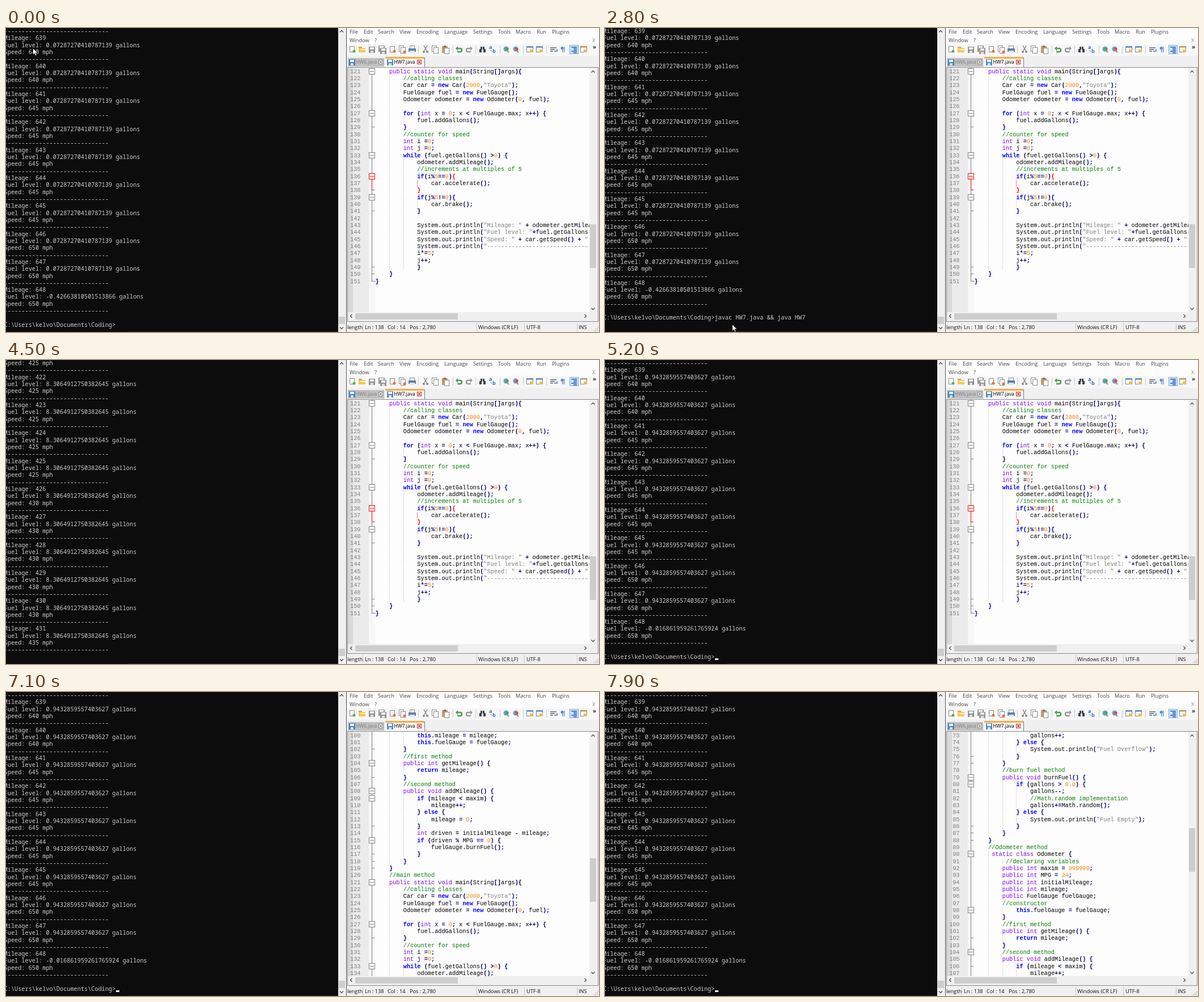
Write an HTML page with a canvas that moves like this. It is 1046 px wide and 536 px high and loops after 8 s.

```html
<!DOCTYPE html>
<html lang="en">
<head>
<meta charset="utf-8">
<title>Terminal and editor</title>
<style>
html, body { margin: 0; width: 100%; height: 100%; overflow: hidden; background: #0c0c0c; }
canvas { display: block; }
</style>
</head>
<body>
<canvas id="stage" width="1046" height="536"></canvas>
<script>
const g = document.getElementById('stage').getContext('2d');
const LOOP = 8000, ROW = 12.326, COL = 6.155;
const UI = '9.2px "Open Sans", sans-serif';
const TAB = '8.5px "Open Sans", sans-serif';
const TERM = '500 10.26px "Noto Sans Mono", monospace';
const CODE = '10.26px "Liberation Mono", monospace';
const FIRST = 73;
const source = `                gallons++;
            } else {
                System.out.println("Fuel Overflow");
            }
        }
        //burn fuel method
        public void burnFuel() {
            if (gallons > 0.0) {
                gallons--;
                //Math.random implementation
                gallons+=Math.random();
            } else {
                System.out.println("Fuel Empty");
            }
        }
    }
    //Odometer method
     static class Odometer {
         //declaring variables
        public int maxim = 999999;
        public int MPG = 24;
        public int initialMileage;
        public int mileage;
        public FuelGauge fuelGauge;
        //constructor
        public Odometer(int mileage, FuelGauge fuelGauge) {
            this.initialMileage = mileage;
            this.mileage = mileage;
            this.fuelGauge = fuelGauge;
        }
        //first method
        public int getMileage() {
            return mileage;
        }
        //second method
        public void addMileage() {
            if (mileage < maxim) {
                mileage++;
            } else {
                mileage = 0;
            }
            int driven = initialMileage - mileage;
            if (driven % MPG == 0) {
                fuelGauge.burnFuel();
            }
        }
    }
    //main method
    public static void main(String[]args){
        //calling classes
        Car car = new Car(2000,"Toyota");
        FuelGauge fuel = new FuelGauge();
        Odometer odometer = new Odometer(0, fuel);

        for (int x = 0; x < FuelGauge.max; x++) {
            fuel.addGallons();
        }
        //counter for speed
        int i =0;
        int j =0;
        while (fuel.getGallons() >0) {
            odometer.addMileage();
            //increments at multiples of 5
            if(i%5==0){
                car.accelerate();
            }
            if(j%5!=0){
                car.brake();
            }

            System.out.println("Mileage: " + odometer.getMileage());
            System.out.println("Fuel level: "+fuel.getGallons() + " gallons");
            System.out.println("Speed: " + car.getSpeed() + " mph");
            System.out.println("------------------------------");
            i*=5;
            j++;
            }
    }
}`.split('\n');

// Timelines: each entry holds from its time until the next one.
const pointerSteps = [
  [0, 47, 35], [100, 130, 190], [200, 316, 514], [300], [500, 228, 522], [600, 224, 522],
  [3400, 190, 420], [3500, 140, 300], [3600, 90, 180], [3700, 40, 80], [3800, 4, 16], [3900],
  [4100, 36, -6], [4200, 36, -11], [4400],
  [4800, 534, 218], [4900, 555, 208], [5000, 578, 195], [5100, 600, 184], [5200]
];
const beamSteps = [[0], [5700, 739, 211], [5800, 743, 220], [5900, 747, 230], [6000, 750, 240], [6100, 753, 247], [6200]];
// time, first line, scrollbar line, row where text lags three lines behind
const scrollSteps = [
  [0, 121, 121], [6400, 118, 118], [6600, 112, 112], [6700, 106, 106], [7100, 100, 100],
  [7200, 94, 94], [7500, 85, 85], [7600, 76, 79], [7900, 73, 79, 25]
];
// time, last mileage, fuel, final fuel
const outputSteps = [
  [0, 648, '0.07287270410787139', '-0.42663810501513866'],
  [4400, 214, '17.513174826903471'],
  [4500, 431, '8.3064912750382645'],
  [4600, 648, '0.9432859557403627', '-0.016861959261765924']
];
const at = (steps, t) => steps.findLast(s => s[0] <= t);

function rect(color, x, y, w, h) { g.fillStyle = color; g.fillRect(x, y, w, h); }
function box(color, x, y, w, h) { g.strokeStyle = color; g.strokeRect(x + .5, y + .5, w - 1, h - 1); }
function text(s, x, y, color, font) {
  if (font) g.font = font;
  g.fillStyle = color;
  g.fillText(s, x, y);
}
function line(color, width, ...p) {
  g.strokeStyle = color;
  g.lineWidth = width;
  g.beginPath();
  for (let i = 0; i < p.length; i += 2) g.lineTo(p[i], p[i + 1]);
  g.stroke();
  g.lineWidth = 1;
}
function disc(color, x, y, r) {
  g.fillStyle = color;
  g.beginPath();
  g.arc(x, y, r, 0, 7);
  g.fill();
}
function chevron(x, y, dx, dy) {
  const px = dy * 3, py = dx * 3;
  line('#505050', 1.4, x - px - dx * 1.5, y - py - dy * 1.5, x + dx * 1.5, y + dy * 1.5, x + px - dx * 1.5, y + py - dy * 1.5);
}

function drawTerminal(t) {
  rect('#0c0c0c', 0, 0, 586, 536);
  rect('#33272c', 216, 535, 370, 1);
  const [, last, fuel, lastFuel] = at(outputSteps, t);
  const running = !lastFuel;
  const shift = t >= 2800 && t < 4400 ? 1 : 0;
  const print = (s, row) => text(s, -3.4, 9.1 + (row - shift) * ROW, '#ccc', TERM);
  const bottom = running ? 41 : 40;
  for (let row = 0; row <= bottom; row++) {
    const k = bottom - row, m = last - (k >> 2);
    print([
      '-'.repeat(30),
      `Speed: ${Math.ceil(m / 5) * 5} mph`,
      `Fuel level: ${m === last && lastFuel || fuel} gallons`,
      `Mileage: ${m}`
    ][k % 4], row);
  }
  if (!running) {
    const typed = t >= 1800 && t < 4400 ? 'javac HW7.java && java HW7' : '';
    print('C:\\Users\\kelvo\\Documents\\Coding>' + typed, 42);
  }
  const caretOn = t >= 1300 && t < 1900 || t >= 2400 && t < 2800 || t >= 4600;
  if (caretOn) rect('#f2f2f2', t >= 1800 && t < 2800 ? 354 : 194, 526, 6, 3);

  rect('#f0f0f0', 586, 0, 14, 536);
  rect('#cdcdcd', 587, 509, 11, 13);
  chevron(592, 6, 0, -1);
  chevron(592, 529, 0, 1);
  rect('#555', 600, 0, 1, 536);
}

function page(x, y = 32, edge = '#8a8a8a') {
  rect('#fff', x - 4, y, 9, 11);
  box(edge, x - 4, y, 9, 11);
}
function floppy(x, y, color) {
  rect(color, x - 5, y - 5, 11, 11);
  rect('#f4f4f4', x - 3, y - 4, 7, 4);
  rect('#ddd', x - 2, y + 2, 5, 4);
}
const icons = {
  page: (x, c) => { page(x); disc(c, x + 4, 41, 2.6); },
  folder: (x, c) => { rect('#d9a441', x - 6, 33, 6, 3); rect(c, x - 6, 35, 12, 8); rect('#fff3c0', x - 3, 37, 10, 2); },
  floppy: (x, c) => floppy(x, 38, c),
  floppies: (x, c) => { floppy(x - 1, 36, c); floppy(x + 2, 40, c); },
  pages: (x, c) => { page(x - 2, 31); page(x + 1, 34); if (c) disc(c, x + 4, 42, 2.6); },
  printer: (x, c) => { page(x, 31); rect(c, x - 6, 36, 13, 6); rect('#dfe8f5', x - 4, 40, 9, 4); },
  scissors: (x, c) => {
    line(c, 1.5, x - 3, 31, x + 2, 40); line(c, 1.5, x + 3, 31, x - 2, 40);
    disc(c, x - 3, 42, 2); disc(c, x + 3, 42, 2);
  },
  paste: (x, c) => { rect(c, x - 6, 32, 10, 12); rect('#777', x - 3, 31, 4, 3); page(x + 2, 35); },
  // back arrow: a head on the side d points away from, with a rounded tail
  turn: (x, c, d) => {
    g.beginPath();
    g.moveTo(x - d * 3, 36);
    g.lineTo(x + d * 2, 36);
    g.bezierCurveTo(x + d * 6, 36, x + d * 6, 42, x + d * 2, 42);
    g.lineTo(x - d * 3, 42);
    g.strokeStyle = c;
    g.lineWidth = 2.4;
    g.stroke();
    g.lineWidth = 1;
    g.fillStyle = c;
    g.fill(new Path2D(`M${x - d * 6} 36L${x - d * 2} 32V40Z`));
  },
  binoculars: (x, c) => { rect(c, x - 5, 37, 4, 6); rect(c, x + 2, 37, 4, 6); rect(c, x - 3, 33, 3, 5); rect(c, x + 1, 33, 3, 5); },
  replace: (x, c) => { text('a', x - 6, 37, c, 'bold 9px "Open Sans", sans-serif'); text('b', x, 44, c); line('#58a', 1, x - 3, 39, x - 1, 42); },
  zoom: (x, c) => { line('#b08850', 2, x, 39, x + 4, 43); disc('#6f9bd0', x - 1, 37, 4.5); disc(c, x + 1, 37, 2.6); },
  window: (x, c) => { rect('#fff', x - 6, 32, 12, 11); rect(c, x - 6, 32, 12, 3); box('#6d87a8', x - 6, 32, 12, 11); rect('#efb94f', x, 38, 6, 5); },
  wrap: (x, c) => { for (let i = 0; i < 3; i++) rect(c, x - 6, 34 + i * 3, 11 - i * 3, 1.5); line('#4a76b8', 1.3, x + 6, 37, x + 6, 41, x + 1, 41); },
  pilcrow: (x, c) => { disc(c, x - 2, 35.5, 2.6); rect(c, x - 2, 33, 1.4, 10); rect(c, x + 1, 33, 1.4, 10); },
  indent: (x, c) => {
    rect('#cce4f7', x - 8, 30, 16, 16); box('#7ab0dc', x - 8, 30, 16, 16);
    for (let i = 0; i < 5; i++) rect(c, x - (i % 3 ? 1 : 5), 33 + i * 2.5, i % 3 ? 6 : 10, 1.4);
  }
};
const toolbar = [
  ['page', 610, '#58b558'], ['folder', 628, '#f3c65b'], ['floppy', 645, '#8f8f8f'], ['floppies', 663, '#989898'],
  ['page', 681, '#e8733d'], ['pages', 699, '#e8733d'], ['printer', 716, '#5f7fae'], ['scissors', 740, '#8a8a8a'],
  ['pages', 757], ['paste', 775, '#c69b5e'], ['turn', 799, '#4d9b52', 1], ['turn', 817, '#999', -1],
  ['binoculars', 840, '#3b424d'], ['replace', 858, '#2f6dc0'], ['zoom', 883, '#3fae49'], ['zoom', 900, '#e04c3c'],
  ['window', 924, '#6fa0d8'], ['window', 941, '#6fa0d8'], ['wrap', 966, '#666'], ['pilcrow', 983, '#5b8fd6'],
  ['indent', 1002, '#2855b5'], ['window', 1019, '#f0b44a']
];
const menu = [
  ['File', 606], ['Edit', 631], ['Search', 656], ['View', 694], ['Encoding', 724], ['Language', 773],
  ['Settings', 824], ['Tools', 868], ['Macro', 899], ['Run', 936], ['Plugins', 963]
];

function closeBox(x, color) {
  rect('#fff', x - 4, 56, 8, 8);
  box(color, x - 4, 56, 8, 8);
  line(color, 1.3, x - 2, 58, x + 2, 62);
  line(color, 1.3, x + 2, 58, x - 2, 62);
}

function drawChrome() {
  rect('#f0f0f0', 601, 0, 445, 536);
  rect('#fdfdfd', 601, 0, 445, 28);
  rect('#f7f7f7', 601, 28, 445, 21);
  for (const [s, x] of menu) text(s, x, 10, '#444', UI);
  text('Window', 606, 24.5, '#444');
  text('?', 650, 24.5, '#444');
  text('X', 1034, 24.5, '#888');
  for (const x of [727, 788, 828, 871, 912, 953]) rect('#c8c8c8', x, 31, 1, 14);
  for (const [kind, x, color, dir] of toolbar) icons[kind](x, color, dir);
  text('»', 1035, 37, '#333', 'bold 10px "Open Sans", sans-serif');

  rect('#c0c0c0', 603, 53, 64, 15);
  floppy(610, 60, '#3b86c6');
  text('HW6.java', 617, 63, '#808080', TAB);
  closeBox(661, '#888');
  rect('#f8f8f8', 669, 51, 69, 18);
  rect('#faaa3c', 669, 51, 69, 3);
  rect('#777', 738, 52, 1, 17);
  floppy(677, 60, '#4b8fcb');
  text('HW7.java', 684.5, 63, '#000');
  closeBox(729, '#c03030');

  box('#8a8a8a', 602, 69, 443, 449);
  rect('#cdcdcd', 616, 503, 181, 11);
  chevron(609, 508, -1, 0);
  chevron(1022, 508, 1, 0);
  for (const x of [629, 830, 914, 1007]) rect('#c8c8c8', x, 520, 1, 15);
  const status = [['length', 602], ['Ln : 138', 633], ['Col : 14', 673], ['Pos : 2,780', 712],
    ['Windows (CR LF)', 833], ['UTF-8', 918], ['INS', 1010]];
  for (const [s, x] of status) text(s, x, 530.5, '#111', UI);
  for (let i = 0; i < 3; i++) for (let j = 0; j <= i; j++) rect('#aaa', 1043 - j * 3, 527 + i * 3, 1.5, 1.5);
}

const token = /\/\/.*|"[^"]*"|\d[\d.]*|[A-Za-z]\w*|[^\w\s"]+/g;
const types = /^(public|static|void|int|class)$/;
const keywords = /^(new|for|while|if|else|return|this)$/;
function style(s) {
  if (s.startsWith('//')) return ['#008000'];
  if (s[0] === '"') return ['#808080'];
  if (/^\d/.test(s)) return ['#ff8000'];
  if (types.test(s)) return ['#8000ff'];
  if (keywords.test(s)) return ['#0000ff', 'bold '];
  return /^\w/.test(s) ? ['#000'] : ['#000080', 'bold '];
}

function drawCode(n, y) {
  const s = source[n - FIRST];
  if (s === undefined) return;
  const shape = s || source[n - FIRST + 1];
  const depth = shape.search(/\S/);
  for (let c = 4; c < depth; c += 4) {
    const x = Math.round(651.5 + c * COL);
    if (n === 137 && c === 12) rect('#ff8080', x, y - 9, 1, ROW);
    else for (let d = 0; d < 12; d += 2) rect('#c4c4c4', x, Math.round(y) - 10 + d, 1, 1);
  }
  for (const m of s.matchAll(token)) {
    const [color, weight = ''] = style(m[0]);
    const x = 651.5 + m.index * COL;
    if (n === 136 && m[0] === '){') {
      text(')', x, y, color, weight + CODE);
      text('{', x + COL, y, '#ff0000');
    } else text(m[0], x, y, n === 138 ? '#ff0000' : color, weight + CODE);
  }
}

function drawFold(n, y) {
  const s = source[n - FIRST].trim();
  const red = n >= 136 && n <= 138;
  const color = red ? '#ff0000' : '#808080';
  const mid = Math.round(y - 4), top = mid - 6;
  const end = n === 151;
  rect(n === 136 ? '#808080' : color, 645, top, 1, 6);
  if (!end) rect(n === 138 ? '#808080' : color, 645, mid, 1, 7);
  if (s.endsWith('{') && s[0] !== '}') {
    rect('#fff', 640, mid - 5, 11, 11);
    box(color, 640, mid - 5, 11, 11);
    rect(color, 642, mid, 7, 1);
  } else if (s === '}') rect(color, 645, mid, end ? 7 : 5, 1);
}

function drawEditor(t) {
  const [, top, bar, lagRow = 99] = at(scrollSteps, t);
  g.save();
  g.beginPath();
  g.rect(603, 70, 426, 431);
  g.clip();
  rect('#fdfdfd', 603, 70, 426, 431);
  rect('#ebebeb', 603, 70, 37, 431);
  rect('#d9d9d9', 603, 70, 9, 431);
  rect('#f7f7f7', 640, 70, 11, 431);
  for (let row = 0; row < 35; row++) {
    const n = top + row, y = 79.8 + row * ROW;
    if (n > 151) break;
    text(String(n).padStart(3), 607, y, '#808080', CODE);
    drawFold(n, y);
    drawCode(row < lagRow ? n : n + 3, y);
  }
  g.restore();
  rect('#f0f0f0', 1029, 70, 14, 431);
  rect('#cdcdcd', 1030, Math.round(346 - (121 - bar) * 2.52), 11, 77);
  chevron(1035.5, 77, 0, -1);
  chevron(1035.5, 495, 0, 1);
}

const arrow = new Path2D('M0 0V11.7L2.7 9.2L4.6 13.4L6.5 12.6L4.6 8.5H8.3Z');
function drawPointer(t) {
  const [, x, y] = at(pointerSteps, t);
  if (x !== undefined) {
    g.save();
    g.translate(x + .5, y + .5);
    g.fillStyle = '#fff';
    g.fill(arrow);
    g.strokeStyle = '#000';
    g.lineWidth = .7;
    g.stroke(arrow);
    g.restore();
  }
  const [, bx, by] = at(beamSteps, t);
  if (bx !== undefined) {
    rect('#333', bx + 2, by, 1, 13);
    rect('#333', bx, by, 5, 1);
    rect('#333', bx, by + 12, 5, 1);
  }
}

const start = performance.now();
function frame() {
  const t = (performance.now() - start) % LOOP;
  drawTerminal(t);
  drawChrome();
  drawEditor(t);
  drawPointer(t);
  requestAnimationFrame(frame);
}
frame();
</script>
</body>
</html>
```
